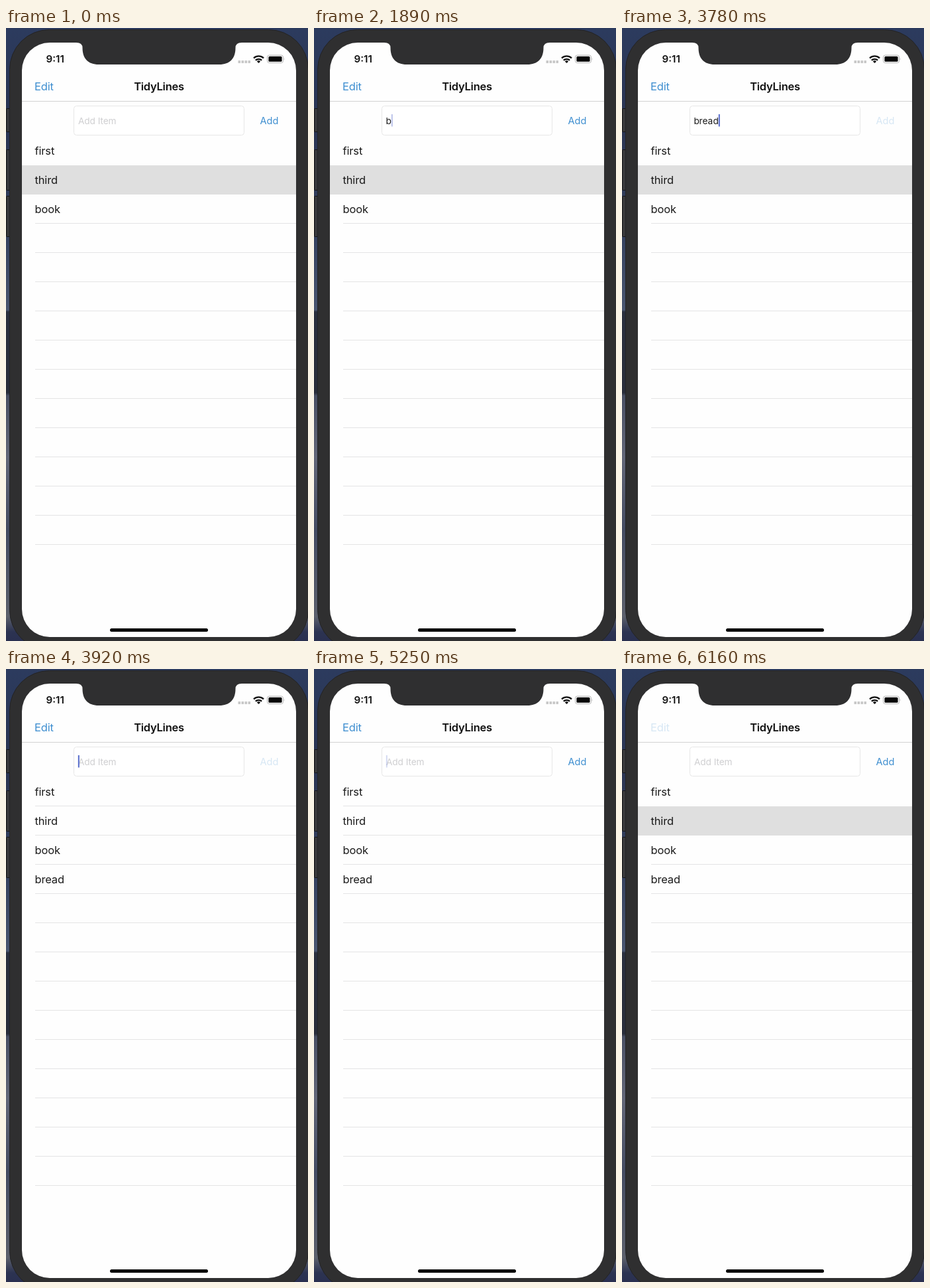
These frames come from a looping animation (456x924 px, 6.23 s). An HTML page:

```html
<!DOCTYPE html>
<html lang="en">
<head>
<meta charset="utf-8">
<title>List app</title>
<style>
  html, body { margin: 0; width: 100%; height: 100%; overflow: hidden; background: #2b3550; }
  svg { display: block; width: 456px; height: 924px; }
  text { font-family: Inter, "Liberation Sans", sans-serif; fill: #1b1b1b; white-space: pre; }
  .row, #edit { font-size: 16.5px; letter-spacing: -0.15px; }
  .bold { font-weight: 600; fill: #111; }
  .input { font-size: 13.7px; letter-spacing: -0.1px; }
  #hint { fill: #cfcfd1; }
  #edit, #add { fill: #3f8fd0; }
  #add { font-size: 14.6px; }
</style>
</head>
<body>
<svg viewBox="0 0 456 924">
  <defs>
    <linearGradient id="sky" x1="0" y1="0" x2="0" y2="1">
      <stop offset="0" stop-color="#2c3b5e"/>
      <stop offset=".15" stop-color="#2a3452"/>
      <stop offset=".34" stop-color="#36425f"/>
      <stop offset=".46" stop-color="#4a5670"/>
      <stop offset=".463" stop-color="#2b303e"/>
      <stop offset=".595" stop-color="#292d3a"/>
      <stop offset=".6" stop-color="#4a5064"/>
      <stop offset=".7" stop-color="#636778"/>
      <stop offset=".82" stop-color="#454c62"/>
      <stop offset=".96" stop-color="#5c606c"/>
      <stop offset=".985" stop-color="#2c3352"/>
      <stop offset="1" stop-color="#2a3050"/>
    </linearGradient>
  </defs>

  <!-- Phone body -->
  <rect width="456" height="924" fill="url(#sky)"/>
  <g fill="#39393b" stroke="#151517">
    <rect x="0.5" y="121.5" width="8" height="35" rx="1"/>
    <rect x="0.5" y="183.5" width="8" height="61" rx="1"/>
    <rect x="0.5" y="253.5" width="8" height="61" rx="1"/>
  </g>
  <rect x="5.5" y="2.5" width="451" height="935" rx="60" fill="#2f2f30" stroke="#232325"/>
  <rect x="24" y="22" width="414" height="896" rx="42" fill="#fefefe"/>
  <path d="M106 21V22Q115.5 22 115.5 30C115.5 46 124 55 140 55H322C338 55 346.5 46 346.5 30Q346.5 22 356 22V21Z" fill="#2f2f30"/>

  <!-- Status bar -->
  <text class="bold" x="60.5" y="52" font-size="15.2">9:11</text>
  <path d="M350.5 51H369" stroke="#c8c8c8" stroke-width="4" stroke-dasharray="3.6 1.4"/>
  <g fill="none" stroke="#111" stroke-width="2.3">
    <path d="M374 45.4A11 11 0 0 1 389 45.4"/>
    <path d="M376.8 48.6A7 7 0 0 1 386.2 48.6"/>
  </g>
  <path d="M381.5 53L378.9 50.4A3.7 3.7 0 0 1 384.1 50.4Z" fill="#111"/>
  <rect x="394.5" y="41" width="24" height="11.6" rx="3" fill="none" stroke="#b5b5b5"/>
  <rect x="396.4" y="42.8" width="20.2" height="8" rx="1.6" fill="#080808"/>
  <path d="M419.8 45Q421.6 46.8 419.8 48.6Z" fill="#b5b5b5"/>

  <!-- Header -->
  <text id="edit" x="43" y="94">Edit</text>
  <text class="bold" x="231" y="94" font-size="16.5" letter-spacing="-0.25" text-anchor="middle">TidyLines</text>
  <rect x="24" y="110" width="414" height="1" fill="#d2d2d2"/>
  <rect x="102.5" y="117.5" width="257" height="44" rx="4" fill="#fff" stroke="#e7e7e7"/>
  <text id="hint" class="input" x="109" y="144.5">Add Item</text>
  <text id="typed" class="input" y="144.5"></text>
  <rect id="caret" x="108.8" y="130" width="2" height="18.5" fill="#566ccb"/>
  <text id="add" x="383.5" y="145">Add</text>

  <!-- List -->
  <g id="lines" fill="#e4e4e5"></g>
  <g id="mark">
    <rect x="24" y="206" width="414" height="1" fill="#fefefe"/>
    <rect x="24" y="207" width="414" height="44" fill="#dfdfdf"/>
  </g>
  <g id="rows"></g>

  <!-- Home indicator -->
  <rect x="157" y="905" width="148" height="5" rx="2.5" fill="#000"/>
</svg>
<script>
  const LOOP = 6230;
  const ROW = 44;
  const SUBMIT = 3920;
  const $ = id => document.getElementById(id);

  function make(parent, tag, attrs, text = '') {
    const el = document.createElementNS('http://www.w3.org/2000/svg', tag);
    for (const key in attrs) el.setAttribute(key, attrs[key]);
    el.textContent = text;
    return parent.appendChild(el);
  }

  // Hold each value from its time (ms) until the next one.
  function hold(el, prop, steps) {
    const frames = steps.map(([t, value]) => ({
      offset: Math.max(0, t - 0.5) / LOOP, [prop]: value, easing: 'step-end'
    }));
    frames.push({ offset: 1, [prop]: steps[steps.length - 1][1] });
    el.animate(frames, { duration: LOOP, iterations: Infinity });
  }

  for (let i = 0; i < 14; i++) {
    make($('lines'), 'rect', { x: 44, y: 206 + i * ROW, width: 394, height: 1 });
  }
  const rows = ['first', 'third', 'book', 'bread'].map((word, i) =>
    make($('rows'), 'text', { class: 'row', x: 43.5, y: 190.5 + i * ROW }, word));

  // Typing: key time, letter, and caret offset after it.
  const keys = [[1890, 'b', 8], [1960, 'r', 13], [2100, 'e', 21.2], [2310, 'a', 29], [2380, 'd', 37]];
  let left = 108.4;
  for (const [t, letter, end] of keys) {
    const glyph = make($('typed').parentNode, 'text', { class: 'input', x: left, y: 144.5 }, letter);
    hold(glyph, 'opacity', [[0, 0], [t, 1], [SUBMIT, 0]]);
    left = 108.4 + end;
  }
  hold($('caret'), 'transform', [
    [0, 'translateX(0px)'],
    ...keys.map(([t, , end]) => [t, `translateX(${end}px)`]),
    [SUBMIT, 'translateX(0px)']
  ]);

  hold($('caret'), 'opacity', [
    [0, 0], [770, 1],
    [1400, 0.65], [1470, 0.3], [1540, 0],
    [1890, 0.4], [1960, 1],
    [3010, 0.65], [3080, 0.3], [3150, 0],
    [3500, 0.4], [3570, 1],
    [4690, 0.8], [4760, 0.5], [4830, 0.2], [4900, 0],
    [5250, 0.25], [5320, 1],
    [5810, 0.65], [5880, 0.3], [5950, 0]
  ]);
  hold($('hint'), 'opacity', [[0, 1], [1890, 0], [SUBMIT, 1]]);
  hold($('add'), 'opacity', [
    [0, 1], [3780, 0.2], [3990, 0.34], [4060, 0.5], [4130, 0.67], [4200, 0.84], [4270, 1]
  ]);
  hold($('mark'), 'opacity', [[0, 1], [SUBMIT, 0], [5320, 1]]);
  hold(rows[3], 'opacity', [[0, 0], [SUBMIT, 1]]);
  hold($('edit'), 'opacity', [[0, 1], [6160, 0.2]]);
</script>
</body>
</html>
```
